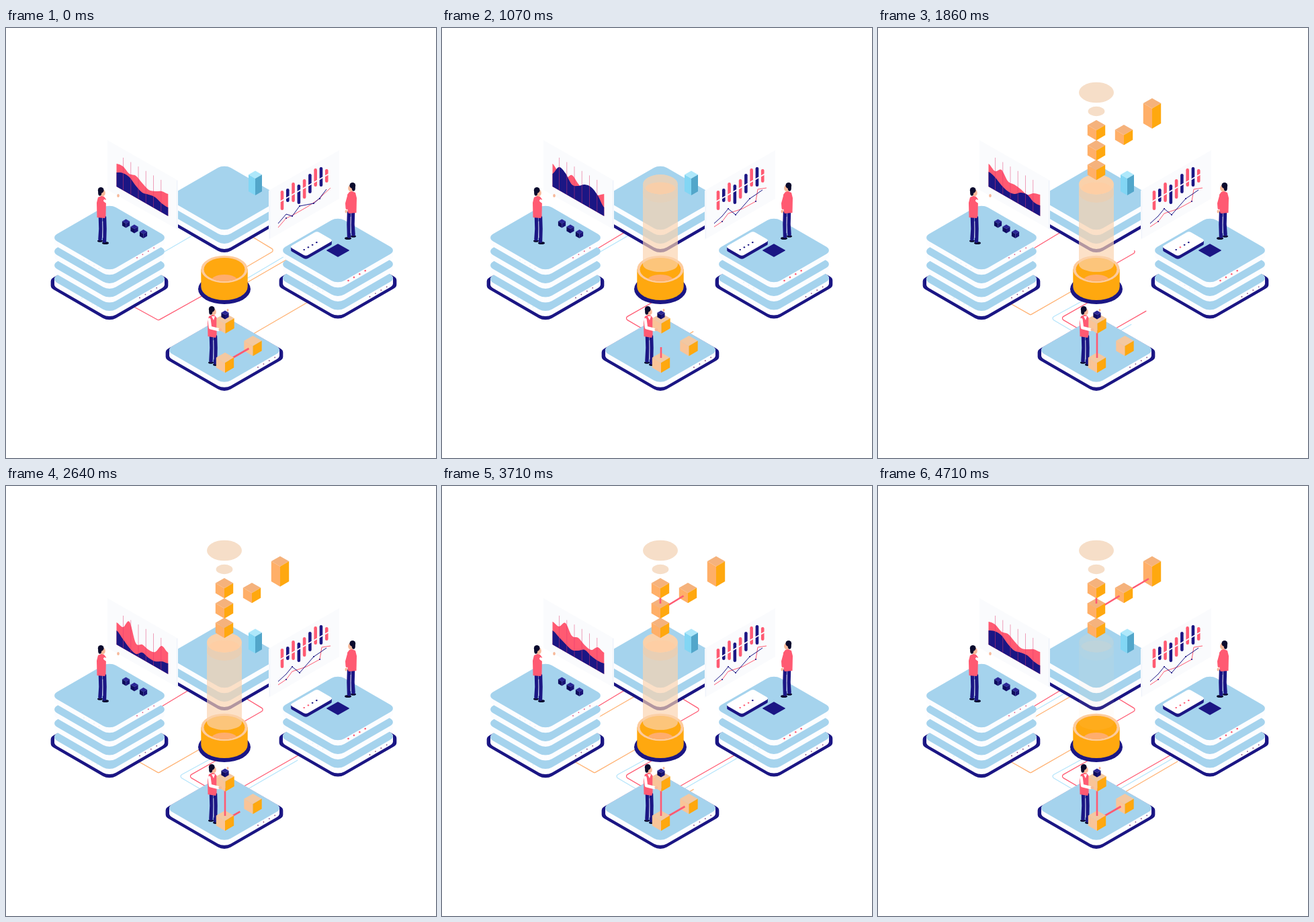
These frames come from a looping animation (640 px wide and 640 px high, 4.78 s). An HTML page with a canvas:

```html
<!DOCTYPE html>
<html lang="en">
<head>
<meta charset="utf-8">
<title>Isometric data flow</title>
<style>
html, body { margin: 0; width: 100%; height: 100%; overflow: hidden; background: #fff; }
canvas { display: block; width: 640px; height: 640px; }
</style>
</head>
<body>
<canvas id="stage" width="640" height="640"></canvas>
<script>
const ctx = document.getElementById('stage').getContext('2d');
const LOOP = 4780, FPS = 14;
const NAVY = '#1b1684', RED = '#ff5a72', BLUE = '#a5d3ed', SKY = '#b5e5fb',
  ORANGE = '#ffa80f', AMBER = '#ffb273', PEACH = '#fdcb9d', SKIN = '#f7b899', BLACK = '#0b0b2e';
const FLOAT_CUBE = ['#f5b27c', '#ffaf68', ORANGE];
const PALE_CUBE = ['#f3c8a1', '#f9c498', ORANGE];
const DARK_CUBE = ['#2b2696', '#0e0b5c', '#181276'];

const clamp = v => Math.max(0, Math.min(1, v));
const ramp = (t, a, b) => clamp((t - a) / (b - a));
const mix = (a, b, k) => a + (b - a) * k;

function poly(color, ...pts) {
  ctx.fillStyle = color;
  ctx.beginPath();
  pts.forEach(p => ctx.lineTo(...p));
  ctx.fill();
}

function oval(color, x, y, rx, ry = rx) {
  ctx.fillStyle = color;
  ctx.beginPath();
  ctx.ellipse(x, y, rx, ry, 0, 0, Math.PI * 2);
  ctx.fill();
}

function stroke(color, width, ...pts) {
  ctx.strokeStyle = color;
  ctx.lineWidth = width;
  ctx.beginPath();
  pts.forEach(p => ctx.lineTo(...p));
  ctx.stroke();
}

function faded(alpha, draw) {
  if (alpha <= 0) return;
  ctx.save();
  ctx.globalAlpha *= alpha;
  draw();
  ctx.restore();
}

// Visible part of a wire, from fraction a to fraction b of its length.
function wire(color, a, b, ...pts) {
  if (b <= a) return;
  let len = 0;
  for (let i = 1; i < pts.length; i++)
    len += Math.hypot(pts[i][0] - pts[i - 1][0], pts[i][1] - pts[i - 1][1]);
  ctx.save();
  ctx.strokeStyle = color;
  ctx.lineWidth = 1.3;
  ctx.setLineDash([len * (b - a), 9999]);
  ctx.lineDashOffset = -len * a;
  ctx.beginPath();
  ctx.moveTo(...pts[0]);
  for (let i = 1; i < pts.length - 1; i++) ctx.arcTo(...pts[i], ...pts[i + 1], 3);
  ctx.lineTo(...pts[pts.length - 1]);
  ctx.stroke();
  ctx.restore();
}

function link(k, x1, y1, x2, y2) {
  if (k > 0) stroke(RED, 2.6, [x1, y1], [mix(x1, x2, k), mix(y1, y2, k)]);
}

function tile(color, x, y, half, radius) {
  ctx.save();
  ctx.transform(.866, .5, -.866, .5, x, y);
  ctx.fillStyle = color;
  ctx.beginPath();
  ctx.roundRect(-half, -half, half * 2, half * 2, radius);
  ctx.fill();
  ctx.restore();
}

function slab(color, x, y, half, radius, depth) {
  for (let d = depth; d >= 0; d--) tile(color, x, y + d, half, radius);
}

function stack(x, y, layers) {
  const gap = 20.6, low = y + gap * (layers - 1);
  slab(NAVY, x, low + 3, 53.6, 11, 7);
  for (let i = layers - 1; i >= 0; i--) {
    slab('#fcfdff', x, y + i * gap, 50.5, 11, 8);
    tile(BLUE, x, y + i * gap, 50.5, 11);
  }
}

function dots(color, x, y, n, r, dx = 8.4, dy = -4.9) {
  for (let i = 0; i < n; i++) oval(color, x + i * dx, y + i * dy, r);
}

function box(x, top, half, height, [lid, left, right]) {
  const q = half * .577;
  poly(lid, [x, top], [x + half, top + q], [x, top + 2 * q], [x - half, top + q]);
  poly(left, [x - half, top + q], [x, top + 2 * q], [x, top + 2 * q + height], [x - half, top + q + height]);
  poly(right, [x + half, top + q], [x, top + 2 * q], [x, top + 2 * q + height], [x + half, top + q + height]);
}

const cube = (x, top, colors) => box(x, top, 13.2, 15, colors);
const darkCube = (x, top) => box(x, top, 5.6, 6.6, DARK_CUBE);

function person(x, y, dir, tall, arms) {
  ctx.save();
  ctx.translate(x, y);
  ctx.scale(dir, 1);
  ctx.lineCap = ctx.lineJoin = 'round';
  const foot = 71 + tall;
  oval(BLACK, -2, foot + 2, 4, 1.8);
  oval(BLACK, 6, foot + 5, 5, 2.1);
  stroke(NAVY, 5.5, [-1.5, 38], [-1, 55], [-2, foot - 1]);
  stroke(NAVY, 5.5, [4.5, 38], [5, 55], [4.5, foot + 2]);
  stroke('#fff', .7, [1.8, 44], [2, foot - 3]);
  stroke(SKIN, 3.5, [1, 3], [1, 8]);
  poly(RED, [-5, 8], [0, 6], [4, 7], [7, 11], [6.5, 36], [5, 39 + tall / 4], [-6.5, 38], [-7, 16]);
  oval(SKIN, 2, 1.5, 3.8, 5);
  oval(BLACK, -.8, -2.6, 4.4, 4.4);
  oval(BLACK, -2.3, 1, 2.6, 4.8);
  arms();
  ctx.restore();
}

const KEY_TIMES = [0, .5, 1.07, 1.86, 2.64, 3.71, 4.74];
const RED_HILLS = [
  [202, 206, 217, 220, 231, 241, 243, 243, 247],
  [202, 211, 221, 219, 230, 243, 246, 245, 247],
  [202, 216, 224, 219, 232, 244, 247, 249, 247],
  [202, 213, 211, 228, 233, 240, 248, 246, 248],
  [203, 210, 202, 234, 236, 244, 247, 238, 248],
  [202, 209, 204, 223, 226, 237, 244, 240, 248]];
const NAVY_HILLS = [
  [215, 216, 222, 235, 245, 248, 252, 261, 267],
  [215, 211, 220, 231, 237, 236, 241, 248, 267],
  [217, 207, 216, 233, 235, 233, 237, 249, 267],
  [214, 222, 234, 243, 247, 245, 248, 259, 264],
  [215, 228, 241, 250, 248, 256, 261, 261, 264],
  [215, 225, 235, 244, 245, 244, 253, 260, 264]];

function pose(keys, t) {
  let i = 0;
  while (i < keys.length - 1 && t >= KEY_TIMES[i + 1]) i++;
  const next = keys[(i + 1) % keys.length], k = ramp(t, KEY_TIMES[i], KEY_TIMES[i + 1]);
  return keys[i].map((v, j) => mix(v, next[j], k));
}

function hills(color, ys) {
  const step = 9.6, x0 = 164.5, last = ys.length - 1;
  const slope = i => (ys[Math.min(last, i + 1)] - ys[Math.max(0, i - 1)]) / 6;
  ctx.fillStyle = color;
  ctx.beginPath();
  ctx.moveTo(x0, 236);
  ctx.lineTo(x0, ys[0]);
  for (let i = 0; i < last; i++) {
    const x = x0 + i * step;
    ctx.bezierCurveTo(x + step / 3, ys[i] + slope(i), x + step * 2 / 3, ys[i + 1] - slope(i + 1), x + step, ys[i + 1]);
  }
  ctx.lineTo(x0 + last * step, 280);
  ctx.fill();
}

function areaPanel(t) {
  poly('#fafbfd', [151, 167], [256, 227], [256, 300], [151, 241]);
  stroke('#eef3fa', 1.2, [254.5, 227], [254.5, 299]);
  hills(RED, pose(RED_HILLS, t));
  hills(NAVY, pose(NAVY_HILLS, t));
  for (let i = 0; i < 6; i++) {
    const x = 174.5 + i * 11.25;
    stroke('rgba(225,55,110,.6)', .8, [x, 193 + i * 6.6], [x, 241 + i * 6.5]);
  }
}

const TREND_X = [405, 417, 426, 437, 458, 467, 477];
const NAVY_TREND = [[291, 277, 280, 265, 261, 253, 240], [291, 282, 275, 270, 254, 258, 243], [291, 280, 269, 278, 254, 248, 241]];
const RED_X = [405, 417, 426, 447, 467, 470, 483];
const RED_TREND = [[297, 283, 279, 267, 254, 250, 238], [296, 287, 279, 265, 251, 248, 238], [296, 288, 276, 269, 258, 240, 238]];

function trend(color, xs, keys, t) {
  const i = t < .5 ? 0 : 1;
  const k = i ? ramp(t, .5, 1.07) : ramp(t, 0, .5);
  const pts = xs.map((x, j) => [x, mix(keys[i][j], keys[i + 1][j], k)]);
  stroke(color, 1, ...pts);
  return pts;
}

function barPanel(t) {
  poly('#fafbfd', [391, 242], [496, 182], [496, 254], [391, 315]);
  stroke('#eef3fa', 1.2, [392.5, 242], [392.5, 313]);
  const spans = [[242, 271], [239, 259], [230, 259], [233, 262], [225, 254], [217, 246], [209, 236], [207, 236], [210, 230]];
  ctx.lineCap = 'round';
  spans.forEach(([a, b], i) => {
    const x = 411 + i * 8.28;
    stroke(i % 2 ? NAVY : RED, 4.6, [x, a + 2.3], [x, b - 2.3]);
  });
  ctx.lineCap = 'butt';
  stroke('#fafbfd', 1.8, [407, 259], [481, 217]);
  const red = trend(RED, RED_X, RED_TREND, t);
  const navy = trend(NAVY, TREND_X, NAVY_TREND, t);
  [red[1], red[4], navy[2], navy[3], navy[4]].forEach(p => oval(NAVY, ...p, 1.1));
}

function wires(t) {
  const fall = (a, b) => 1 - ramp(t, a, b), rise = (a, b) => ramp(t, a, b);
  wire(RED, rise(0, .79), 1, [185, 412], [227, 435], [295, 397]);
  wire(ORANGE === '' ? RED : AMBER, 0, fall(.52, 1.05), [352, 359], [400, 331], [362, 308]);
  wire(AMBER, 0, fall(.45, 1.05), [355, 381], [425, 340.5]);
  wire(SKY, 0, fall(0, .86), [355, 375], [421, 336]);
  wire(AMBER, 0, t < 2 ? fall(0, 1.2) : rise(3.58, 4.78), [365, 457], [451, 407]);
  wire(RED, 0, rise(.05, .48), [312, 409], [271.5, 432], [304, 451]);
  wire(RED, 0, rise(.55, 1.05), [212, 340], [290, 293]);
  wire(SKY, 0, t < 2.5 ? fall(1.1, 1.75) : rise(3.9, 4.55), [215, 345], [297, 297.5]);
  wire(AMBER, 0, rise(2.8, 3.55), [215, 354.5], [300, 305.5]);
  wire(AMBER, 0, rise(1.1, 1.8), [295, 388], [227, 427], [190, 406]);
  wire(SKY, 0, rise(1.15, 1.8), [312, 402], [257, 432], [296, 455]);
  wire(RED, 0, rise(1.4, 2.3), [350, 353], [385, 333], [352, 313]);
  wire(RED, 0, rise(1.22, 2.5), [354, 447], [445, 395]);
  wire(SKY, 0, rise(1.62, 2.75), [360, 451], [442, 403.5]);
}

function cylinder() {
  oval(NAVY, 325, 388.5, 39, 22.5);
  ctx.fillStyle = ORANGE;
  ctx.beginPath();
  ctx.ellipse(325, 385, 34.7, 20, 0, 0, Math.PI);
  ctx.lineTo(290.3, 359);
  ctx.lineTo(359.7, 359);
  ctx.fill();
  oval(PEACH, 325, 359, 34.7, 20.2);
  oval(ORANGE, 325, 359.3, 30.5, 17.4);
  ctx.save();
  ctx.clip();
  oval('#ffad6d', 325, 378, 21, 11);
  ctx.restore();
}

function beam(t) {
  const p = ramp(t, .07, .69), lid = ramp(t, .66, 1.5);
  if (!p) return;
  faded(1 - ramp(t, 4.29, 4.77), () => {
    const w = mix(10.4, 26, p), top = mix(352, 233, p);
    ctx.fillStyle = 'rgba(251,211,174,.68)';
    ctx.beginPath();
    ctx.ellipse(325, top, w, w * .57, 0, Math.PI, 0, true);
    ctx.lineTo(325 + w, 352);
    ctx.ellipse(325, 352, w, 11, 0, 0, Math.PI);
    ctx.fill();
    faded(lid, () => {
      oval('rgba(246,200,160,.4)', 325, 245, 26, 15);
      oval('rgba(253,207,167,.97)', 325, 233, 26, 15);
    });
    faded(ramp(t, .66, .95), () => {
      oval('rgba(251,211,174,.5)', 325, 233, 26, 15);
      oval('rgba(255,205,163,.7)', 325, 238.5, 22, 9);
    });
  });
}

function floats(t) {
  const shown = (start, draw) => faded(ramp(t, start, start + .28), draw);
  shown(1.14, () => cube(325, 196, FLOAT_CUBE));
  shown(1.2, () => cube(325, 167, FLOAT_CUBE));
  link(ramp(t, 2.8, 3.2), 325, 175, 325, 164);
  shown(1.32, () => cube(366, 144, FLOAT_CUBE));
  link(ramp(t, 3, 3.6), 334, 179, 359.5, 163.5);
  if (t > 3) {
    ctx.save();
    ctx.beginPath();
    ctx.rect(311, 174, 27, 23);
    ctx.clip();
    cube(325, 167, FLOAT_CUBE);
    link(ramp(t, 2.8, 3.2), 325, 175, 325, 164);
    ctx.restore();
  }
  shown(1.26, () => cube(325, 137, FLOAT_CUBE));
  shown(1.38, () => box(408, 104.5, 13.2, 30, FLOAT_CUBE));
  link(ramp(t, 3.8, 4.52), 379, 152, 403, 138);
  shown(1.4, () => oval('#f6dec8', 325, 124, 12.4, 7.2));
  shown(1.42, () => oval('#f6dec8', 325, 96, 26, 15.3));
}

function leftStack() {
  stack(154, 312, 4);
  dots('#e0527f', 195, 342, 4, .9);
  dots('#8a4a80', 199, 401.5, 4, .9);
  dots('#e6f1fa', 116, 345, 4, .9, 7.5, 4.3);
  dots('#e6f1fa', 113, 402, 4, .9, 7.5, 4.3);
  darkCube(178.5, 284.5);
  darkCube(191, 292.5);
  darkCube(204.5, 300);
  person(142, 244, 1, 0, () => {
    stroke('#fff', 4, [5, 13], [9, 16], [22, 7]);
    oval(SKIN, 25, 5.5, 1.8, 2.6);
  });
}

function rightStack(t) {
  stack(494, 331, 3);
  dots(RED, 509.5, 376, 4, 1.3);
  dots('#8a4a80', 541.5, 400, 4, .9);
  dots('#e6f1fa', 449, 378.5, 4, .9, 7.5, 4.3);
  for (const [color, y] of [[NAVY, 5], [NAVY, 3], [NAVY, 1.5], ['#fff', 0]]) {
    ctx.save();
    ctx.transform(.866, .5, -.866, .5, 454.5, 321 + y);
    ctx.fillStyle = color;
    ctx.beginPath();
    ctx.roundRect(-14, -23.5, 28, 47, 4);
    ctx.fill();
    ctx.restore();
  }
  [2.5, 1.6, 2.75, 4.3].forEach((at, i) =>
    oval(t >= at ? RED : NAVY, 443.7 + i * 6.2, 330 - i * 3.6, 1.4, 1.1));
  tile(NAVY, 494, 331, 10, .8);
  person(515, 237, -1, 0, () => {
    stroke(RED, 4, [5, 13], [8, 24], [7.5, 31]);
    oval(SKIN, 8.7, 36, 1.8, 2.6);
  });
}

function frontStack(t) {
  stack(325, 479.5, 1);
  dots('#8a4a80', 375, 505, 4, .9);
  person(307, 421, 1, 4, () => {
    poly('#fff', [-1, 8], [4, 8], [2, 14]);
  });
  cube(367.5, 458, PALE_CUBE);
  const reach = t < 2 ? 1 - t / .8 : ramp(t, 2.2, 3);
  link(reach, 332, 494, 361.5, 477);
  cube(326, 483, PALE_CUBE);
  link(ramp(t, .7, 1.65), 326, 491, 326, 450);
  cube(326.5, 424.5, PALE_CUBE);
  darkCube(326, 420.5);
  oval(SKIN, 330, 420, 1.5, 2);
  ctx.lineCap = ctx.lineJoin = 'round';
  stroke('#fff', 4.4, [302.5, 434], [304, 446], [316, 449]);
  ctx.lineCap = 'butt';
  ctx.lineJoin = 'miter';
  oval(SKIN, 318.8, 449, 2.5, 2);
}

function draw(t) {
  ctx.fillStyle = '#fff';
  ctx.fillRect(0, 0, 640, 640);
  wires(t);
  stack(325, 253, 2);
  box(371, 212.5, 10, 25, ['#aee8fb', '#82d6f4', '#52a6ca']);
  areaPanel(t);
  barPanel(t);
  cylinder();
  beam(t);
  floats(t);
  leftStack();
  rightStack(t);
  frontStack(t);
}

function tick() {
  const step = Math.floor((performance.now() % LOOP + 5) * FPS / 1000);
  draw(Math.min(step, 66) / FPS);
  requestAnimationFrame(tick);
}
tick();
</script>
</body>
</html>
```
